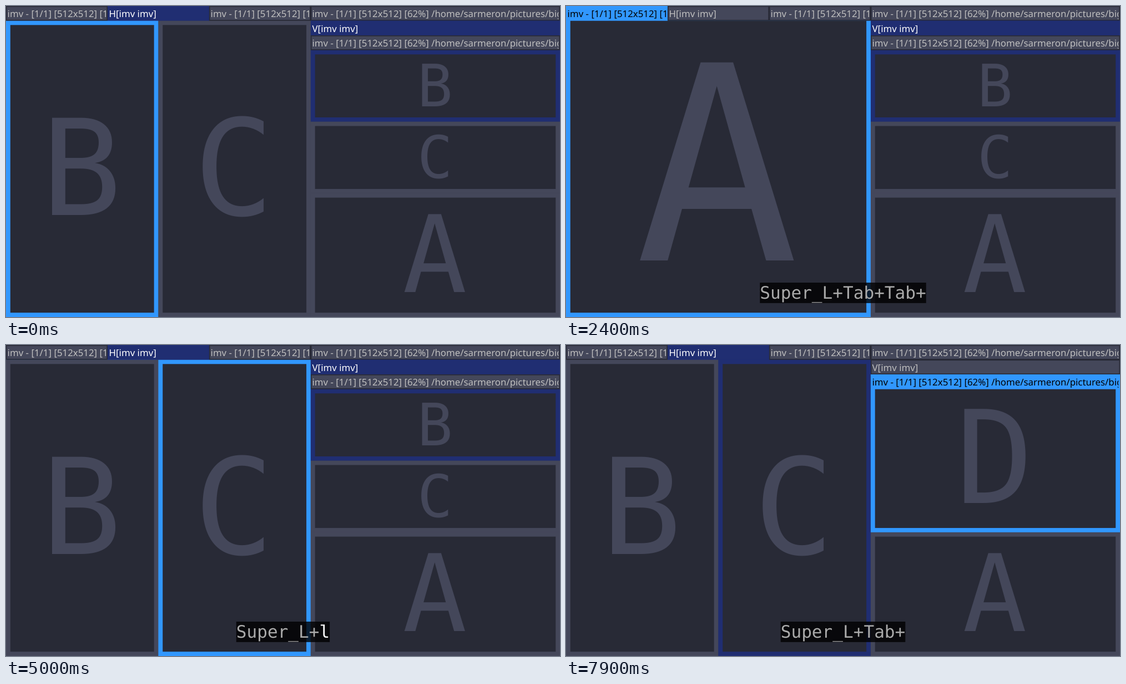
An HTML page with a canvas for the animation above (8 s loop, 998 by 561 pixels).

```html
<!DOCTYPE html>
<html lang="en">
<head>
<meta charset="utf-8">
<title>Tiling window focus</title>
<style>
  html, body { margin: 0; width: 100%; height: 100%; overflow: hidden; background: #282a36; }
  canvas { display: block; }
</style>
</head>
<body>
<canvas id="stage" width="998" height="561"></canvas>
<script>
const ctx = document.getElementById('stage').getContext('2d');

// The desktop is laid out in 1920-wide units and scaled to the stage.
const SCALE = 998 / 1920, HEIGHT = 561 / SCALE;
const ROW = 51, BORDER = 15, SPLIT_X = 1056, SPLIT_Y = 650;
const LOOP = 8000;

const DARK = '#282a36', GREY = '#44475a', NAVY = '#202e72', BLUE = '#3197fe';
const TEXT_ON = { [GREY]: '#bfbfbf', [NAVY]: '#ffffff', [BLUE]: '#000000' };
const IMAGE_TITLE = 'imv - [1/1] [512x512] [62%] /home/sarmeron/pictures/big.png';
const LEFT_TITLE = IMAGE_TITLE.replace('62%', '130%');

// start time, shown keys, active window on the left and right, focused side
const STEPS = [
  [0, '', 'B', 'B', 'left'],
  [1300, 'Super_L+', 'B', 'B', 'left'],
  [1800, 'Super_L+Tab+', 'D', 'B', 'left'],
  [2300, 'Super_L+Tab+Tab+', 'A', 'B', 'left'],
  [2800, 'Super_L+Tab+Tab+Tab+', 'B', 'B', 'left'],
  [4200, '', 'B', 'B', 'left'],
  [4600, 'Super_L+', 'B', 'B', 'left'],
  [5000, 'Super_L+l', 'C', 'B', 'left'],
  [5400, 'Super_L+ll', 'C', 'B', 'right'],
  [7000, '', 'C', 'B', 'right'],
  [7400, 'Super_L+', 'C', 'B', 'right'],
  [7700, 'Super_L+Tab+', 'C', 'D', 'right']
];

function rect(color, x, y, w, h) {
  ctx.fillStyle = color;
  ctx.fillRect(x, y, w, h);
}

function tab(title, color, x, y, w) {
  rect(color === GREY ? DARK : color, x, y, w, ROW);
  rect(color, x + 3, y + 3, w - 6, ROW - 6);
  ctx.save();
  ctx.beginPath();
  ctx.rect(x + 5, y, w - 10, ROW);
  ctx.clip();
  ctx.font = '32.4px "Noto Sans", sans-serif';
  ctx.textAlign = 'left';
  ctx.fillStyle = TEXT_ON[color];
  ctx.fillText(title, x + 5, y + 38.5);
  ctx.restore();
}

function pane(letter, color, x, y, w, h, top = BORDER) {
  const innerW = w - 2 * BORDER, innerH = h - top - BORDER;
  rect(color, x, y, w, h);
  rect(DARK, x + BORDER, y + top, innerW, innerH);
  const size = Math.min(innerW, innerH);
  ctx.font = `${size * 0.93}px "DejaVu Sans Mono", monospace`;
  ctx.textAlign = 'center';
  ctx.fillStyle = GREY;
  ctx.fillText(letter, x + w / 2 - size * 0.005, y + top + innerH / 2 + size * 0.321);
}

const isGroup = letter => letter === 'B' || letter === 'C';

// Colours for the three tabs: image A, the B/C group, image D.
function tabColors(active, accent) {
  return [
    active === 'A' ? accent : GREY,
    isGroup(active) ? NAVY : GREY,
    active === 'D' ? accent : GREY
  ];
}

function drawLeft(active, accent) {
  const tabW = SPLIT_X / 3, half = SPLIT_X / 2, h = HEIGHT - ROW;
  if (isGroup(active)) {
    ['B', 'C'].forEach((letter, i) =>
      pane(letter, letter === active ? accent : GREY, i * half, ROW, half, h));
  } else {
    pane(active, accent, 0, ROW, SPLIT_X, h, 0);
  }
  const colors = tabColors(active, accent);
  [LEFT_TITLE, 'H[imv imv]', LEFT_TITLE].forEach((title, i) =>
    tab(title, colors[i], i * tabW, 0, tabW));
}

function drawRight(active, accent) {
  const w = 1920 - SPLIT_X, top = 3 * ROW, h = SPLIT_Y - top;
  if (isGroup(active)) {
    ['B', 'C'].forEach((letter, i) =>
      pane(letter, letter === active ? accent : GREY, SPLIT_X, top + i * h / 2, w, h / 2));
  } else {
    pane(active, accent, SPLIT_X, top, w, h, 0);
  }
  pane('A', GREY, SPLIT_X, SPLIT_Y, w, HEIGHT - SPLIT_Y);
  const colors = tabColors(active, accent);
  [IMAGE_TITLE, 'V[imv imv]', IMAGE_TITLE].forEach((title, i) =>
    tab(title, colors[i], SPLIT_X, i * ROW, w));
}

function drawKeys(keys) {
  if (!keys) return;
  ctx.font = '59.8px "DejaVu Sans Mono", monospace';
  ctx.textAlign = 'left';
  const width = ctx.measureText(keys).width;
  const special = keys.slice(0, keys.lastIndexOf('+') + 1);
  const x = 960 - width / 2;
  rect('rgba(0, 0, 0, 0.8)', x, 960, width, 71);
  ctx.fillStyle = '#aaaaaa';
  ctx.fillText(special, x, 1016);
  ctx.fillStyle = '#ffffff';
  ctx.fillText(keys.slice(special.length), x + ctx.measureText(special).width, 1016);
}

function draw(now) {
  const t = now % LOOP;
  const [, keys, left, right, side] = STEPS.findLast(step => step[0] <= t);
  ctx.setTransform(SCALE, 0, 0, SCALE, 0, 0);
  ctx.textRendering = 'geometricPrecision';
  drawLeft(left, side === 'left' ? BLUE : NAVY);
  drawRight(right, side === 'right' ? BLUE : NAVY);
  drawKeys(keys);
}

const start = performance.now();
function tick() {
  draw(performance.now() - start);
  requestAnimationFrame(tick);
}
tick();
</script>
</body>
</html>
```
